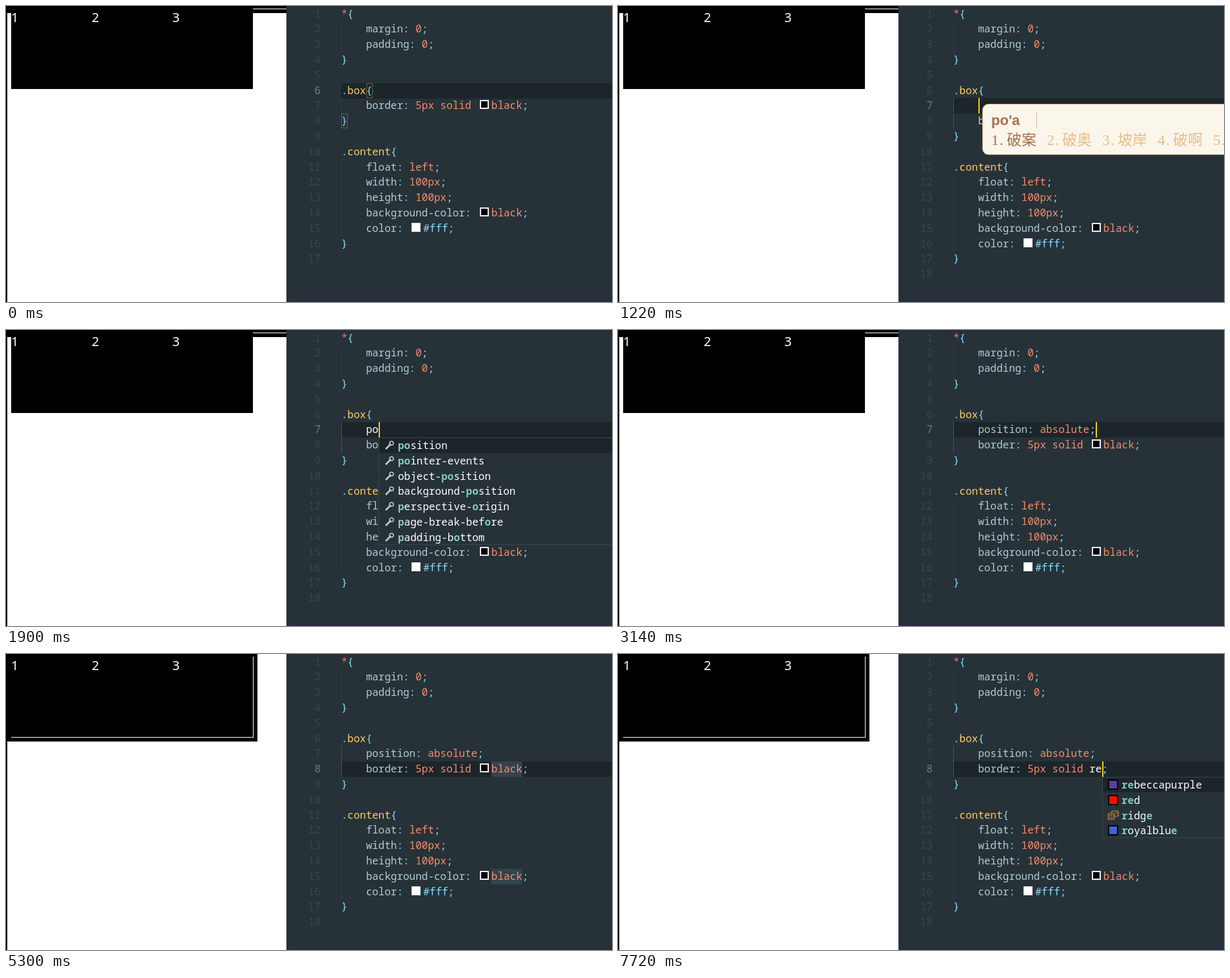
Write an HTML page that moves like this. It is 940x460 px and loops after 8000 ms.

```html
<!DOCTYPE html>
<html lang="en">
<head>
<meta charset="utf-8">
<title>Positioning a bordered box</title>
<style>
  html, body { margin: 0; width: 940px; height: 460px; overflow: hidden; background: #fff; }
  svg { display: block; }
  .code { font: 16px "Noto Sans Mono", "DejaVu Sans Mono", monospace; }
  .page { font: 20px "Noto Sans", "Open Sans", sans-serif; }
  .pinyin { font: bold 22px "Liberation Sans", Arial, sans-serif; }
  .digit { font: 23.4px "Liberation Serif", serif; }
  .han { font: 300 23px "Noto Sans CJK SC", "Noto Sans CJK", sans-serif; }
  .hint { font: 300 18px "Noto Sans CJK SC", "Noto Sans CJK", sans-serif; }
</style>
</head>
<body>
<svg id="stage" width="940" height="460" viewBox="0 0 940 460"></svg>
<script>
(() => {
const LOOP = 8000, ROW = 23.8, CELL = 9.6, LEFT = 520, SWATCH = 21.6;
const C = {
  bg: '#263238', line: '#1c252a', number: '#37474f', active: '#67808c',
  prop: '#b2ccd6', value: '#f78c6c', punct: '#89ddff', name: '#ffcb6b',
  star: '#f07178', caret: '#ffcc00', white: '#fff', match: '#80cbc4',
  guide: '#303e45', guideOn: '#43545c', brown: '#a8704a', tan: '#e6bd8c'
};
const stage = document.getElementById('stage');

const rect = (x, y, w, h, fill, more = '') =>
  `<rect x="${x}" y="${y}" width="${w}" height="${h}" fill="${fill}" ${more}/>`;
const text = (x, y, str, cls, fill, more = '') =>
  `<text x="${x}" y="${y}" class="${cls}" fill="${fill}" ${more}>${str}</text>`;
const rowTop = row => Math.round(0.5 + ROW * (row - 1));

const border = value => `    border: 5px solid ${value};`;
const BORDER = border('@kblack');
const ABSOLUTE = '    position: absolute;';
const WORD = 752.6;
const afterLetters = n => Math.round(WORD + n * CELL);

const P_LIST = ['padding', 'padding-bottom', 'padding-left', 'padding-right', 'padding-top',
  'page-break-after', 'page-break-before', 'page-break-inside', 'perspective',
  'perspective-origin', 'pointer-events', 'position'];
const PO_LIST = ['position', 'pointer-events', 'object-position', 'background-position',
  'perspective-origin', 'page-break-before', 'padding-bottom'];
const R_LIST = ['rebeccapurple', 'red', 'rgb', 'rgba', 'ridge', 'rosybrown', 'royalblue'];
const RE_LIST = ['rebeccapurple', 'red', 'ridge', 'royalblue'];
const CHIP = { rebeccapurple: '#5b3f97', red: '#ff0d00', rosybrown: '#bc8f8f', royalblue: '#4264d2' };

const ime = (typed, words, step, caret, hint = 0) => ({ typed, words, step, caret, hint });
const PAN = ['破案', '破奥', '坡岸', '破啊', ''];
const menu = (x, query, items) => ({ x, query, items });

// Each step changes only the listed parts of the scene.
const STEPS = [
  [0, { box: [BORDER], row: 6, caret: 0, pair: 1, freed: 0, ime: 0, menu: 0, mark: 0 }],
  [120, { box: ['', BORDER], row: 7, caret: 559, pair: 0 }],
  [590, { ime: ime('p', ['盘', '怕', '屁', '骗', ''], 62.8, 593) }],
  [850, { ime: ime('po', ['破', '坡', '婆', '泼', ''], 62.8, 607) }],
  [1080, { ime: ime("po'a", PAN, 86, 649) }],
  [1270, { ime: ime("po'a", PAN, 86, 649, 0.5) }],
  [1360, { ime: ime("po'a", PAN, 86, 649, 1) }],
  [1450, { ime: 0 }],
  [1680, { box: ['    !p', BORDER], caret: 568, menu: menu(568, 'p', P_LIST) }],
  [1840, { box: ['    !po', BORDER], caret: 578, menu: menu(578, 'po', PO_LIST) }],
  [2000, { box: ['    !poa', BORDER], caret: 587, menu: menu(587, 'poa', ['position: absolute;']) }],
  [2280, { box: [ABSOLUTE, BORDER], caret: 741, menu: 0 }],
  [2600, { caret: 0 }],
  [3140, { caret: 741 }],
  [3220, { freed: 1 }],
  [3650, { caret: 0 }],
  [4110, { row: 8, caret: 763 }],
  [4370, { mark: 1 }],
  [4620, { caret: afterLetters(2) }],
  [4850, { caret: afterLetters(3) }],
  [5050, { caret: afterLetters(4) }],
  [5300, { caret: 0 }],
  [5620, { caret: 801 }],
  [6010, { caret: 0 }],
  [6130, { box: [ABSOLUTE, border('@k!blac')], caret: afterLetters(4), mark: 0 }],
  [6260, { box: [ABSOLUTE, border('@k!bla')], caret: afterLetters(3) }],
  [6390, { box: [ABSOLUTE, border('@k!bl')], caret: 773 }],
  [6550, { box: [ABSOLUTE, border('@k!b')], caret: 763 }],
  [6700, { box: [ABSOLUTE, border('@k')], caret: 753 }],
  [7020, { box: [ABSOLUTE, border('')], caret: 731 }],
  [7490, { box: [ABSOLUTE, border('!r')], caret: 741 }],
  [7600, { menu: menu(741, 'r', R_LIST) }],
  [7720, { box: [ABSOLUTE, border('!re')], caret: 751, menu: menu(751, 're', RE_LIST) }]
];
let merged = {};
const scenes = STEPS.map(([at, change]) => (merged = { ...merged, ...change, at }));

function page(freed) {
  let s = rect(0, 0, 435, 460, '#fff') + rect(0, 0, 2, 460, '#000');
  if (freed) {
    s += rect(2, 0, 388, 136, '#000') + rect(383, 4, 1, 126, '#fff') + rect(8, 129, 376, 1, '#fff');
  } else {
    s += rect(2, 0, 433, 11, '#000') + rect(383, 4, 52, 1, '#fff') + rect(8, 0, 375, 129, '#000');
  }
  return s + [1, 2, 3].map(n => text(8 + 125 * (n - 1), 25, n, 'page', '#fff')).join('');
}

function codeLine(row, src) {
  const y = rowTop(row);
  let x = LEFT, s = '', colon = false;
  for (const [tok] of src.matchAll(/@[kw]|!\w+| +|[.*:;{}]|#\w+|[\w-]+/g)) {
    if (tok[0] === '@') {
      const left = Math.round(x + 3.8);
      s += rect(left, y + 3, 14, 14, '#eee') +
        rect(left + 2, y + 5, 10, 10, tok === '@k' ? '#000' : '#fff');
      x += SWATCH;
      continue;
    }
    const word = tok.replace('!', '');
    let fill = colon ? C.value : src[0] === ' ' ? C.prop : C.name, more = '';
    if (tok[0] === '!') fill = C.white;
    else if (tok === '*') fill = C.star;
    else if (/^[.:;{}#]/.test(tok)) fill = C.punct;
    else if (fill === C.name) more = 'font-style="italic"';
    if (tok === ':') colon = true;
    if (word.trim()) s += text(x.toFixed(1), y + 17, word, 'code', fill, more);
    x += word.length * CELL;
  }
  return s;
}

function editor(sc) {
  const lines = ['*{', '    margin: 0;', '    padding: 0;', '}', '', '.box{', ...sc.box, '}', '',
    '.content{', '    float: left;', '    width: 100px;', '    height: 100px;',
    '    background-color: @kblack;', '    color: @w#fff;', '}', ''];
  const end = 7 + sc.box.length;
  let s = rect(435, 0, 505, 460, C.bg) + rect(435, 454, 505, 6, '#273040');
  s += rect(LEFT, rowTop(sc.row), 420, 24, C.line);
  if (sc.mark) s += [8, 15].map(r => rect(WORD, rowTop(r), 48, 24, '#34444c')).join('');
  const guide = (from, to, fill) => rect(LEFT, rowTop(from), 1, rowTop(to) - rowTop(from), fill);
  s += guide(2, 4, C.guide) + guide(7, end, sc.row > 6 ? C.guideOn : C.guide) +
    guide(end + 3, end + 8, C.guide);
  if (sc.pair) {
    const frame = (x, row) => rect(x + .5, rowTop(row) + .5, 9, 22, 'none', 'stroke="#66653f"');
    s += frame(559, 6) + frame(520, end);
  }
  lines.forEach((src, i) => {
    const row = i + 1, fill = row === sc.row ? C.active : C.number;
    s += text(488, rowTop(row) + 17, row, 'code', fill, 'text-anchor="end"') + codeLine(row, src);
  });
  if (sc.caret) s += rect(sc.caret, rowTop(sc.row), 2, 24, C.caret);
  return s;
}

function icon(item, x, y) {
  if (CHIP[item]) return rect(x, y, 16, 16, '#000') + rect(x + 2, y + 2, 12, 12, CHIP[item]);
  if (item === 'ridge') {
    return `<g fill="${C.bg}" stroke="#e0954a" stroke-width="1.2">` +
      `<rect x="${x + 6}" y="${y + 1}" width="10" height="8" rx="1"/>` +
      `<rect x="${x + .5}" y="${y + 5}" width="9" height="9" rx="1"/>` +
      `<path d="M${x + 2.5} ${y + 8}h5m-5 3h5m3-7h4"/></g>`;
  }
  return `<path d="M${x + 2} ${y + 14}l8-8" stroke="#c5cdd1" stroke-width="2.5"/>` +
    `<circle cx="${x + 11}" cy="${y + 5}" r="3" fill="none" stroke="#c5cdd1" stroke-width="1.5"/>`;
}

function suggestions({ x, query, items }, row) {
  const y = rowTop(row + 1), h = Math.round(items.length * ROW);
  let s = rect(x + .5, y + .5, 400, h - 1, C.bg, 'stroke="#35454d"') + rect(x + 1, y + 1, 399, 23, C.line);
  items.forEach((item, i) => {
    const itemTop = Math.round(y + i * ROW);
    let left = query;
    const label = [...item].map(ch => {
      if (ch !== left[0]) return ch;
      left = left.slice(1);
      return `<tspan fill="${C.match}" font-weight="700">${ch}</tspan>`;
    }).join('');
    s += icon(item, x + 9, itemTop + 4) +
      text(x + 30, itemTop + 18, label, 'code', C.white, 'style="font-weight:500"');
  });
  return s;
}

function imePanel({ typed, words, step, caret, hint }) {
  let s = rect(566, 154, 400, 79, '#000', 'rx="9" opacity=".25"') +
    rect(565.5, 152.5, 400, 78.5, '#fbf6eb', 'rx="9" stroke="#c9a683"') +
    text(579, 185, typed, 'pinyin', C.brown) + rect(caret, 165, 1, 25, '#c9b9a6');
  words.forEach((word, i) => {
    const x = 579 + i * step, fill = i ? C.tan : C.brown;
    s += text(x, 216, i + 1, 'digit', fill) + text(x + 13, 216, '.', 'digit', fill) +
      text(x + 24, 216, word, 'han', fill);
  });
  if (typed.length < 3) s += '<ellipse cx="892.5" cy="188" rx="32" ry="25" fill="#111"/>';
  if (hint) s += text(679, 184, '继续输入部首笔画找到单字', 'hint', '#f3e0c9', `opacity="${hint}"`);
  return s;
}

const draw = sc => page(sc.freed) + editor(sc) +
  (sc.menu ? suggestions(sc.menu, sc.row) : '') + (sc.ime ? imePanel(sc.ime) : '');

const start = performance.now();
let shown = null;
function tick() {
  const t = (performance.now() - start) % LOOP;
  const scene = scenes.findLast(sc => sc.at <= t);
  if (scene !== shown) stage.innerHTML = draw(shown = scene);
  requestAnimationFrame(tick);
}
tick();
})();
</script>
</body>
</html>
```
